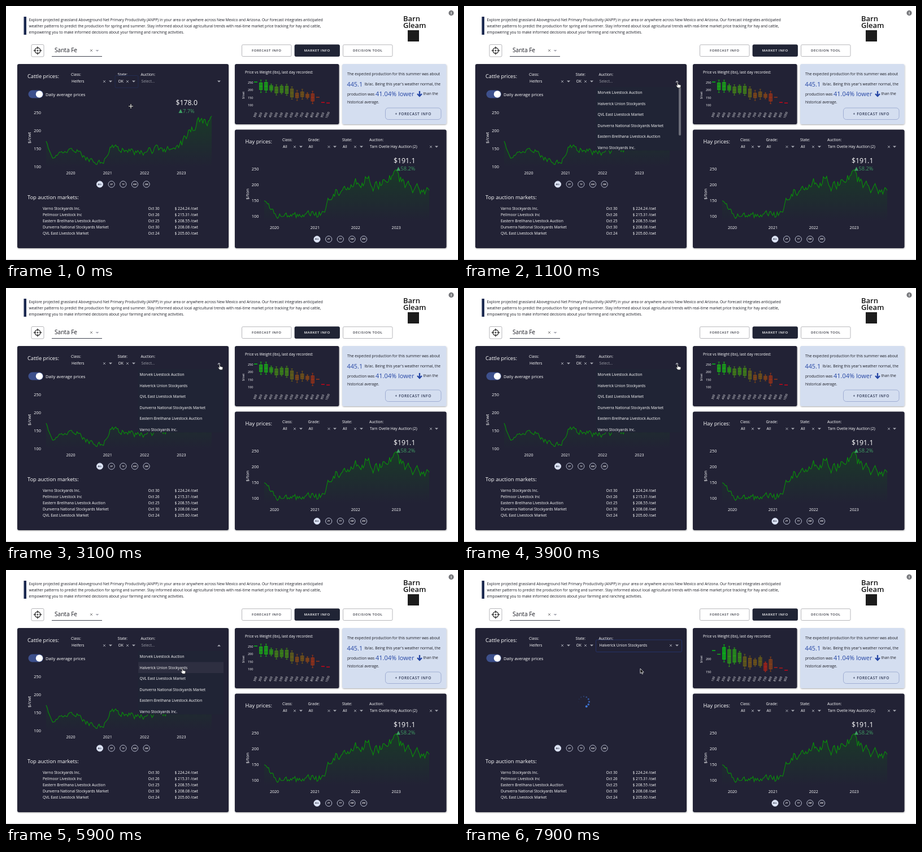
An HTML page that plays this animation: 800x451 px, repeating every 8 s.

```html
<!DOCTYPE html>
<html lang="en">
<head>
<meta charset="utf-8">
<title>Market dashboard</title>
<style>
html, body { margin: 0; width: 100%; height: 100%; overflow: hidden; background: #fff; }
svg { display: block; width: 100vw; height: 100vh; font-family: "Open Sans", "Noto Sans", sans-serif; font-weight: 500; }
text { white-space: pre; }
</style>
</head>
<body>
<svg id="stage" viewBox="0 0 800 451"></svg>
<script>
const NAVY = '#202435', INK = '#1b1c24', BLUE = '#2546a5', GREY = '#a9abb5';
const LOOP = 8000, OPEN = 800, BAR_GONE = 2000, PICK = 7200, LOADED = 7500;
const picked = 'Halverick Union Stockyards';

// y is the vertical middle of the capitals
const text = (x, y, s, size = 6.7, fill = '#fff', more = '') =>
  `<text x="${x}" y="${y + size * 0.36}" font-size="${size}" fill="${fill}" ${more}>${s}</text>`;
const rect = (x, y, w, h, fill, r = 0, more = '') =>
  `<rect x="${x}" y="${y}" width="${w}" height="${h}" rx="${r}" fill="${fill}" ${more}/>`;
const path = (d, stroke, w = 1, fill = 'none') =>
  `<path d="${d}" stroke="${stroke}" stroke-width="${w}" fill="${fill}"/>`;
const circle = (x, y, r, fill, more = '') => `<circle cx="${x}" cy="${y}" r="${r}" fill="${fill}" ${more}/>`;
const group = (id, body) => `<g id="${id}">${body}</g>`;
const centred = 'text-anchor="middle"', light = 'font-weight="400"';
const turned = (x, y, a) => `${centred} transform="rotate(${a} ${x} ${y})"`;

const cross = (x, y, c = GREY) => path(`M${x - 2} ${y - 2}l4 4m0 -4l-4 4`, c, 0.9);
const caret = (x, y, up) => path(`M${x - 3} ${y + (up ? 1.5 : -1.5)}h6l-3 ${up ? -3 : 3}z`, 'none', 0, GREY);
const panel = (x, y, w, h, fill) => rect(x, y, w, h, fill, 3, 'filter="url(#shade)"');

const select = (label, value, x, y, crossX, caretX) =>
  text(x, y, label) + text(x + 1, y + 12, value) + cross(crossX, y + 12) + caret(caretX, y + 12);

const ranges = (x, y) => ['ALL', '2Y', '1Y', '6M', '2M'].map((s, i) => {
  const cx = x + i * 20.65;
  return circle(cx, y, 5.6, i ? 'none' : '#dde4f6', 'stroke="#dde4f6" stroke-width=".8"') +
    text(cx, y, s, 4.1, i ? '#fff' : NAVY, centred + ' font-weight="600"');
}).join('');

function random(seed) {
  return () => (seed = (seed * 16807) % 2147483647) / 2147483647;
}

// Straight trend through a few [x, y] turning points
function trend(keys, x) {
  const i = Math.max(1, keys.findIndex(k => k[0] >= x)), [x0, y0] = keys[i - 1], [x1, y1] = keys[i];
  return y0 + (y1 - y0) * (x - x0) / (x1 - x0);
}

// Price line: trend plus seeded noise that widens to the right
function priceLine(keys, floor, amp, seed) {
  const r = random(seed), n = 150, x0 = keys[0][0], x1 = keys[keys.length - 1][0], pts = [];
  for (let i = 0, drift = 0; i <= n; i++) {
    const u = i / n, x = x0 + (x1 - x0) * u;
    drift = 0.45 * drift + (r() - 0.5) * amp * (0.6 + u);
    pts.push(`${x.toFixed(1)} ${(trend(keys, x) + drift).toFixed(1)}`);
  }
  const d = 'M' + pts.join('L');
  return path(`${d}V${floor}H${x0}z`, 'none', 0, 'url(#fade)') + path(d, '#079307', 1.05);
}

const axes = (x, y, step, unitX, unitY, unit, yearX, yearStep, yearY) =>
  [250, 200, 150, 100].map((v, i) => text(x, y + i * step, v, 7.4, '#fff', 'text-anchor="end"')).join('') +
  [2020, 2021, 2022, 2023].map((v, i) => text(yearX + i * yearStep, yearY, v, 7.1, '#fff', centred)).join('') +
  text(unitX, unitY, unit, 8, '#fff', turned(unitX, unitY, -90));

const change = (x, y, price, percent) =>
  text(x, y, price, 12.3, '#fff', light) +
  path(`M${x + 5} ${y + 18}h7l-3.5 -7z`, 'none', 0, '#3f9d63') +
  text(x + 12.5, y + 14.5, percent, 9.2, '#3f9d63', light);

// Prices fall with weight; outside first..last there is one sale only, a flat mark
function boxes(seed, top, drop, size, first, last) {
  const r = random(seed);
  return Array.from({ length: 15 }, (_, i) => {
    const x = 442 + i * 9.15, u = i / 14, mid = top + drop * u + (r() - 0.5) * 8;
    const h = size * (1.1 - 0.6 * u) * (0.5 + r()) / 2, reach = h + 2 + 4 * r();
    const t = Math.max(0, Math.min(1, (mid - top) / drop));
    const c = `rgb(${Math.round(225 * t)},${Math.round(215 * (1 - t))},20)`;
    if (i < first || i > last) return path(`M${x - 3} ${mid}h6`, c, 1.3);
    return path(`M${x} ${mid - reach}v${2 * reach}M${x - 1.5} ${mid - reach}h3m-3 ${2 * reach}h3`, c, 0.8) +
      rect(x - 2.7, mid - h, 5.4, 2 * h, c, 0, `fill-opacity=".55" stroke="${c}" stroke-width=".8"`) +
      path(`M${x - 2.7} ${mid}h5.4`, c, 0.8);
  }).join('');
}
const boxTicks = (high, y, step, count, labels) =>
  Array.from({ length: count }, (_, i) =>
    text(437.5, y + i * step, high - i * 50, 5.6, '#fff', 'text-anchor="end"')).join('') +
  labels.map((v, i) => {
    const x = 441 + i * 9.15;
    return text(x, 193.5, v, 5.3, '#fff', turned(x, 193.5, -68));
  }).join('');
const weights = Array.from({ length: 14 }, (_, i) => 300 + i * 50);

const intro = [
  'Explore projected grassland Aboveground Net Primary Productivity (ANPP) in your area or anywhere across New Mexico and Arizona. Our forecast integrates anticipated',
  'weather patterns to predict the production for spring and summer. Stay informed about local agricultural trends with real-time market price tracking for hay and cattle,',
  'empowering you to make informed decisions about your farming and ranching activities.'];

const caps = (x, y, s, size, fill, gap) =>
  text(x, y, s, size, fill, `${centred} letter-spacing="${gap}" font-weight="600"`);
const tab = (x, w, s, on) =>
  rect(x, 68.8, w, 20.7, on ? NAVY : '#fff', 2, `stroke="${on ? NAVY : '#a5a5aa'}" stroke-width=".8"`) +
  caps(x + w / 2, 79.3, s, 6, on ? '#fff' : '#33353f', 0.55);

const header =
  rect(31.5, 19, 4.5, 32, '#1b2950') +
  intro.map((s, i) => text(40.5, 24.3 + i * 11, s, 6.67, INK)).join('') +
  text(703, 22, 'Barn', 13, '#111', 'font-weight="600"') + text(703, 34, 'Gleam', 13, '#111', 'font-weight="600"') +
  rect(711, 43, 20, 20, '#1c1c1c') +
  circle(788, 12.4, 4.6, '#77787c') + text(788, 12.4, 'i', 7, '#fff', centred + ' font-weight="700"') +
  rect(45, 68.5, 22, 21.5, '#fff', 2, 'stroke="#a5a5aa" stroke-width=".8"') +
  circle(56, 79.2, 5, 'none', 'stroke="#222" stroke-width="1.2"') + circle(56, 79.2, 1.2, '#222') +
  path('M56 72v4.5m0 5.5v4.5M48.8 79.2h4.5m5.5 0h4.5', '#222', 1.2) +
  text(86, 78.5, 'Santa Fe', 10.1, INK, light) + cross(151, 79, '#777') + caret(161.5, 79.5) +
  path('M81 89.5H170', '#2a2d3c', 0.9) +
  tab(417.5, 87.5, 'FORECAST INFO') + tab(511, 79.5, 'MARKET INFO', true) + tab(596.5, 87.5, 'DECISION TOOL') +
  path('M0 450.2H800', '#cfcfd2', 1);

const markets = [
  ['Varno Stockyards Inc.', 30, '224.24'],
  ['Pellmoor Livestock Inc', 26, '215.31'],
  ['Eastern Brellhana Livestock Auction', 25, '208.55'],
  ['Dunverra National Stockyards Market', 30, '208.08'],
  ['QVL East Livestock Market', 24, '205.60']];
const options = ['Morvek Livestock Auction', picked, markets[4][0], markets[3][0], markets[2][0], markets[0][0]];

const cattleTrend = [[71, 243], [83, 266], [112, 257], [128, 257], [142, 271], [172, 278], [184, 250],
  [225, 260], [270, 256], [307, 249], [338, 207], [364, 207]];
const hayTrend = [[457, 350], [480, 370], [505, 374], [560, 370], [580, 330], [640, 307], [655, 322],
  [684, 303], [730, 328], [749, 321]];

const cattle = panel(20, 103, 374, 327, NAVY) +
  text(38, 124.3, 'Cattle prices:', 9.3) +
  select('Class:', 'Heifers', 115, 122, 174, 185) + select('State:', 'OK', 197.5, 122, 215, 226) +
  rect(39.5, 149.6, 26.5, 14, '#3d508c', 7) + circle(59, 156.6, 6.2, '#fff') +
  text(70, 156.8, 'Daily average prices', 7.6) +
  group('chart', axes(62, 189.7, 31.9, 41, 234, '$/cwt', 114.5, 65.3, 296.5) +
    priceLine(cattleTrend, 285.5, 10, 41) + change(300.5, 172, '$178.0', '7.7%')) +
  group('spinner', '') + ranges(166, 316.5) +
  text(38, 340, 'Top auction markets:', 9.3) +
  markets.map(([name, day, price], i) => {
    const y = 359.2 + i * 11.2;
    return text(65, y, name) + text(251.5, y, 'Oct ' + day) + text(298.5, y, `$ ${price} /cwt`);
  }).join('');

const auction =
  group('stateFocus', rect(193, 123.5, 41, 21.5, 'none', 2, 'stroke="#232f58" stroke-width=".8"')) +
  group('prompt', text(239.5, 134, 'Select...', 6.7, '#9a9ca6')) +
  group('choice', rect(233.5, 124, 152, 21.5, 'none', 2, 'stroke="#26356e" stroke-width=".9"') +
    text(239.5, 134, picked) + cross(366, 134)) +
  text(238.5, 122, 'Auction:') +
  group('caretDown', caret(377, 134)) + group('caretUp', caret(377, 134, true)) +
  group('menu', rect(234, 143.5, 151, 113, NAVY) + group('hover', rect(234, 143.8, 151, 19.6, '#2e2f41')) +
    options.map((s, i) => text(236.5, 153.6 + i * 19.6, s)).join('') +
    group('bar', rect(380, 144, 4, 86, '#6b6d78', 2)));

const weightPanel = panel(405, 103, 184.5, 107, NAVY) +
  text(423, 117.3, 'Price vs Weight (lbs), last day recorded:', 6.69) +
  text(420, 158.5, '$/cwt', 5.2, '#fff', turned(420, 158.5, -90)) +
  group('boxAll', boxTicks(250, 136, 13.4, 4, weights.concat(1050)) + boxes(8, 139, 31, 15, 1, 11)) +
  group('boxOne', boxTicks(200, 157.5, 23.5, 2, [100].concat(weights)) + boxes(23, 147, 30, 19, 2, 11));

const summary = panel(595, 103, 184.5, 107, '#d4def0') +
  text(604, 121, 'The expected production for this summer was about', 6.72, INK) +
  text(603.5, 139, '445.1', 10.8, BLUE, light) +
  text(634.5, 139, 'lb/ac. Being this year\'s weather normal, the', 6.7, INK) +
  text(604, 157, 'production was', 6.7, INK) + text(654, 156.5, '41.04% lower', 11, BLUE, light) +
  path('M732 151v9m-4 -4l4 4l4 -4', BLUE, 2.3) + text(738.5, 156, 'than the', 6.7, INK) +
  text(604, 171, 'historical average.', 6.7, INK) +
  rect(671.5, 181, 98.5, 20.5, 'none', 5, 'stroke="#93a3cc" stroke-width=".8"') +
  caps(720.7, 191.3, '+ FORECAST INFO', 6.5, '#2a3350', 0.65);

const hay = panel(405, 219.5, 374.5, 210.5, NAVY) +
  text(423.5, 240.5, 'Hay prices:', 9.3) +
  select('Class:', 'All', 489, 238, 511, 522) + select('Grade:', 'All', 534.5, 238, 571.5, 582) +
  select('State:', 'All', 595, 238, 618, 629) +
  select('Auction:', 'Tarn Ovelle Hay Auction (2)', 643, 238, 752, 762) +
  axes(447.5, 289, 28.1, 427, 334, '$/ton', 475, 71.9, 393.5) +
  priceLine(hayTrend, 382, 14, 77) + change(686, 274.5, '$191.1', '58.2%') + ranges(550.5, 414);

const pointers =
  group('plus', path('M-4.5 0h9M0 -4.5v9', '#111', 2.4) + path('M-4 0h8M0 -4v8', '#fff', 1.1)) +
  group('arrow', path('M0 0v8.6l2 -1.8l1.3 3l1.4 -.6l-1.3 -2.9h2.7z', '#fff', 0.8, '#000')) +
  group('hand', path('M-1 0q1 -1 1.6 0l.5 3.3l4 .9q1 .5 .8 1.6l-.9 3.4h-4.6l-3 -3.7q.2 -1.2 1.5 -.6l.7 .5z',
    '#222', 0.7, '#fff'));

const stage = document.getElementById('stage');
stage.innerHTML = `<defs>
  <filter id="shade" x="-5%" y="-5%" width="110%" height="112%">
    <feDropShadow dx=".4" dy="1" stdDeviation="1" flood-color="#000" flood-opacity=".35"/></filter>
  <linearGradient id="fade" x2="0" y2="1"><stop stop-color="#008000" stop-opacity=".25"/>
    <stop offset="1" stop-color="#008000" stop-opacity="0"/></linearGradient></defs>` +
  header + cattle + auction + weightPanel + summary + hay + group('pointer', pointers);

const part = id => document.getElementById(id);
const show = (id, on) => part(id).setAttribute('display', on ? 'inline' : 'none');

// Pointer stops: time, x, y
const stops = [[0, 221, 178], [150, 221, 178], [650, 378, 136], [4300, 378, 136],
  [4600, 365, 149], [5100, 312, 175], [LOOP, 312, 175]];
function pointerAt(t) {
  const i = stops.findIndex(s => s[0] > t), [t0, x0, y0] = stops[i - 1], [t1, x1, y1] = stops[i];
  const u = (t - t0) / (t1 - t0), e = u * u * (3 - 2 * u);
  return [x0 + (x1 - x0) * e, y0 + (y1 - y0) * e];
}

// Twelve dots, one turn a second, fading behind the leading dot
function spinner(t) {
  const lead = t * 12 / 1000 + 3.2;
  return Array.from({ length: 12 }, (_, i) => {
    const a = i * Math.PI / 6, age = (lead - i) % 12, k = Math.max(0, 1 - age / 9);
    return circle(212 + 9.5 * Math.cos(a), 234 + 9.5 * Math.sin(a), 0.5 + 1.4 * k, '#3f78dc', `opacity="${k}"`);
  }).join('');
}

function draw(now) {
  const t = Math.floor((now % LOOP) / 100) * 100;
  const open = t >= OPEN && t < PICK, done = t >= PICK, [x, y] = pointerAt(t);
  const row = Math.floor((y - 143.8) / 19.6);
  show('menu', open);
  show('bar', t < BAR_GONE);
  show('caretUp', open);
  show('caretDown', !open);
  show('stateFocus', t < OPEN);
  show('prompt', !done);
  show('choice', done);
  show('chart', !done);
  show('spinner', done);
  show('boxAll', t < LOADED);
  show('boxOne', t >= LOADED);
  show('hover', open && row >= 0);
  part('hover').setAttribute('transform', `translate(0 ${row * 19.6})`);
  if (done) part('spinner').innerHTML = spinner(t);

  const plus = t < OPEN && y > 165, hand = open || (!done && y < 146);
  show('plus', plus);
  show('hand', hand);
  show('arrow', !plus && !hand);
  part('pointer').setAttribute('transform', `translate(${x} ${y})`);
  requestAnimationFrame(() => draw(performance.now()));
}
draw(0);
</script>
</body>
</html>
```
